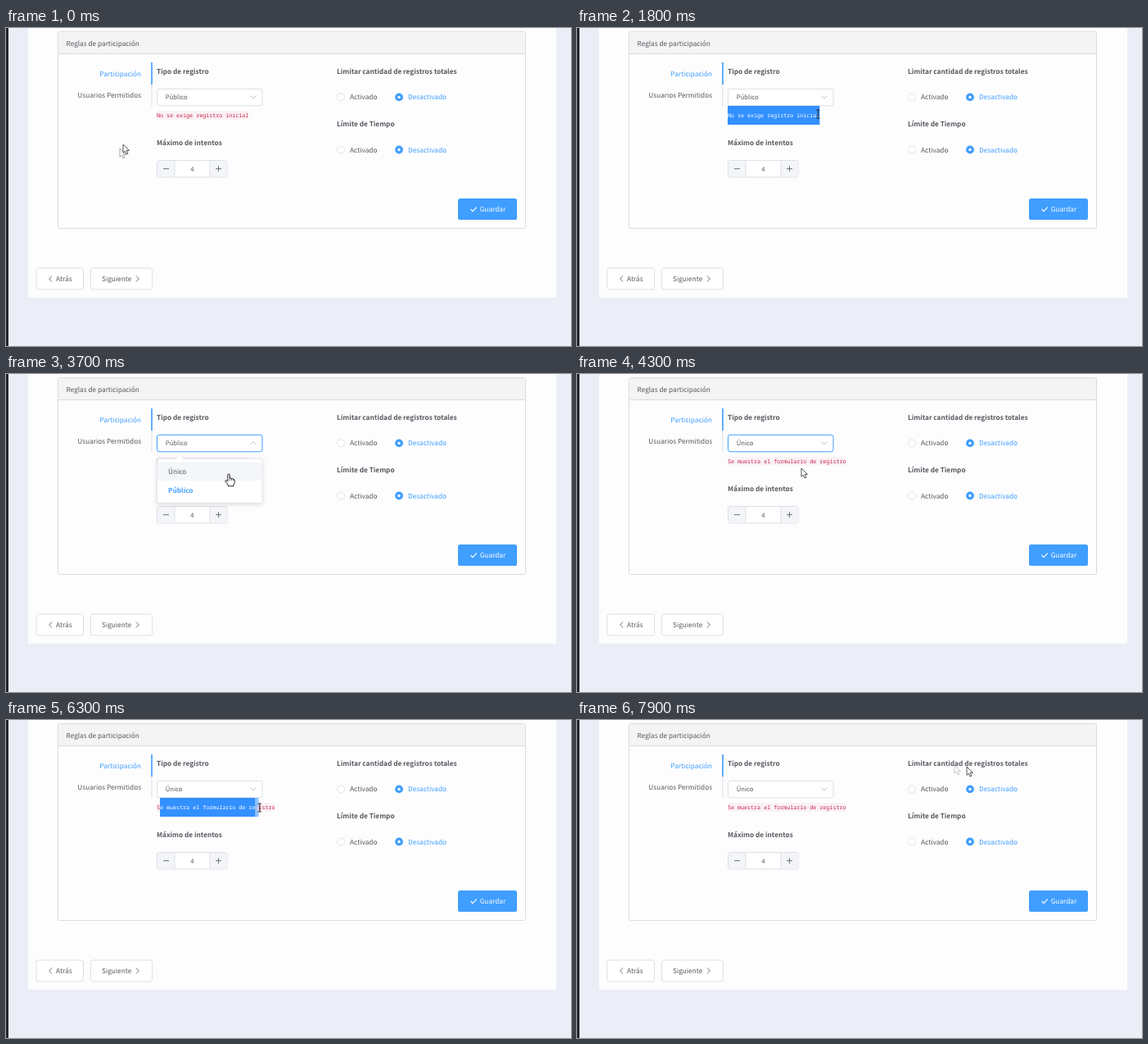
Recreate the animation shown at these times as an HTML page. Size 690x388 px, loop 8 s.

```html
<!DOCTYPE html>
<html lang="es">
<head>
<meta charset="utf-8">
<style>
html, body { margin: 0; width: 100%; height: 100%; overflow: hidden; background: #ebeef6; }
svg { display: block; width: 100%; height: 100%; }
text { font: 8.26px "Noto Sans CJK SC", "Noto Sans CJK JP", "Noto Sans", sans-serif; fill: #55585e; text-rendering: geometricPrecision; white-space: pre; }
.b { font-weight: 700; }
.m { font-weight: 500; }
.s { font-size: 7.68px; }
.blue { fill: #409eff; }
.white { fill: #fff; }
.code { font: 6.69px "Noto Sans Mono", "DejaVu Sans Mono", monospace; fill: #c7254e; }
.code.white { fill: #fff; }
.box { fill: #fff; stroke: #dcdfe6; }
.line { fill: none; stroke: #606266; stroke-width: .9; }
</style>
</head>
<body>
<svg viewBox="0 0 690 388" preserveAspectRatio="none">
  <defs>
    <filter id="shadow" x="-10%" y="-10%" width="120%" height="130%">
      <feDropShadow dx="0" dy="1.3" stdDeviation="2.5" flood-opacity=".14"/>
    </filter>
    <clipPath id="clip"><rect id="clipBox" y="95" height="23"/></clipPath>
  </defs>

  <rect width="690" height="388" fill="#ebeef6"/>
  <rect width="3" height="388" fill="#22272e"/>
  <rect x="27" width="645" height="329" fill="#fdfdfe"/>
  <rect x="63.5" y="4.5" width="571" height="240" rx="2" fill="#fdfdfe" stroke="#dcdcde"/>
  <path d="M64 5H634V31.5H64Z" fill="#f4f4f5"/>
  <path d="M64 31.5H634" stroke="#dcdcde"/>
  <text x="73.5" y="21.5" fill="#444">Reglas de participación</text>

  <path d="M178 42V95" stroke="#e4e7ed" stroke-width="1.4"/>
  <path d="M178 42V69" stroke="#409eff" stroke-width="1.6"/>
  <text class="blue" x="165" y="58.6" text-anchor="end">Participación</text>
  <text x="165" y="85.2" text-anchor="end">Usuarios Permitidos</text>

  <text class="b" x="184" y="56">Tipo de registro</text>
  <text class="b" x="184" y="143.4">Máximo de intentos</text>
  <text class="b" x="404" y="56">Limitar cantidad de registros totales</text>
  <text class="b" x="404" y="120.2">Límite de Tiempo</text>
  <g id="radios"></g>

  <rect class="box" x="184.5" y="161.5" width="85.5" height="20.5" rx="2.5"/>
  <path d="M187 162H206V181.5H187Q185 181.5 185 179.5V164Q185 162 187 162ZM249 162H267.500Q269.500 162 269.500 164V179.500Q269.500 181.500 267.500 181.500H249Z" fill="#f3f5f9"/>
  <path d="M206 162V181.500M249 162V181.500" stroke="#dcdfe6"/>
  <path class="line" d="M192 171.700H199M256 171.700H263M259.500 168.200V175.200"/>
  <text class="s" x="227.300" y="174.600" text-anchor="middle">4</text>

  <rect x="552" y="208" width="72" height="26" rx="2.600" fill="#409eff"/>
  <path d="M567.500 221L570 223.600L574.700 218.600" fill="none" stroke="#fff" stroke-width="1.100"/>
  <text class="m white" x="578.700" y="224.200">Guardar</text>
  <rect class="box" x="37" y="293" width="57.500" height="26" rx="2.600"/>
  <rect class="box" x="103.500" y="293" width="75" height="26" rx="2.600"/>
  <path class="line" d="M56 302.500L52.700 306L56 309.500M159 302.500L162.300 306L159 309.500"/>
  <text class="m" x="61" y="309.200">Atrás</text>
  <text class="m" x="117" y="309.200">Siguiente</text>

  <rect id="select" class="box" x="184.500" y="74.300" width="128.500" height="20.500" rx="2.600"/>
  <text id="value" class="s" x="194.800" y="87.400"></text>
  <path id="chevron" d="M298.500 82.500L302 86L305.500 82.500" fill="none" stroke="#b8bcc5" stroke-width=".9"/>

  <rect id="codeBack" x="184" y="101" height="11" rx="1.500" fill="#faf1f4"/>
  <text id="code" class="code" x="184" y="108.800"></text>
  <rect id="mark" y="95" height="23" fill="#3390ff"/>
  <rect id="markEdge" y="95" height="23" fill="#3390ff" opacity=".55"/>
  <text id="codeSel" class="code white" x="184" y="108.800" clip-path="url(#clip)"></text>

  <g id="menu">
    <g filter="url(#shadow)">
      <rect id="menuBox" class="box" x="184.500" y="103.500" width="128.500" rx="2.600" stroke-width=".7"/>
    </g>
    <path d="M207.500 104L212 99.500L216.500 104Z" fill="#fff"/>
    <rect id="hover" x="185" width="127.500" height="22.400" fill="#f4f6fa"/>
    <text x="198" y="122.200">Único</text>
    <text class="b blue" x="198" y="144.600">Público</text>
    <g id="opening" fill="none">
      <path d="M185 129.300H313M185 152.900H313" stroke="#f58a62" stroke-width="1.400"/>
      <rect x="185.500" y="156.500" width="127" height="8" rx="3" stroke="#c2c4c8" stroke-width=".9"/>
    </g>
  </g>

  <g id="ghost" opacity=".35"></g>
  <g id="cursor"></g>
</svg>
<script>
const $ = id => document.getElementById(id);
const set = (id, attrs) => { for (const k in attrs) $(id).setAttribute(k, attrs[k]); };

$("radios").innerHTML = [84.4, 148.5].map(y => `
  <circle class="box" cx="409" cy="${y}" r="4.5" stroke-width=".9"/>
  <text x="420" y="${y + 3}">Activado</text>
  <circle class="blue" cx="480" cy="${y}" r="4.9"/><circle class="white" cx="480" cy="${y}" r="1.7"/>
  <text class="blue" x="491" y="${y + 3}">Desactivado</text>`).join("");

const shapes = {
  arrow: `<path d="M0 0V10.300L2.400 8.200L4 12L5.900 11.200L4.300 7.500H7.400Z" fill="#fff" stroke="#33363b" stroke-width=".85"/>`,
  beam: `<path d="M-2 -5H-.5L0 -4.500L.5 -5H2M-2 5H-.5L0 4.500L.5 5H2M0 -4.500V4.500" fill="none" stroke="#2b2d33" stroke-width="1.100"/>`,
  hand: `<path d="M-1.200 .6Q0 -.8 1.200 .6V5L3.600 5.400L6 6.200Q7.200 6.700 7.200 8V10.500L6 13V14.800H-.8V13.200L-4 9.400Q-4.800 8 -3.300 7.600L-1.200 9Z" fill="#fff" stroke="#25272c" stroke-width="1"/>
    <path d="M1.300 5V8M3.500 5.500V8M5.600 6.200V8.300" stroke="#25272c" stroke-width=".7"/>`
};

// time, x, y, pointer shape from that time on
const path = [
  [-100, 139, 147, "arrow"], [0, 143, 142, "arrow"], [500, 184, 106, "beam"], [900, 233, 106, "beam"],
  [1500, 294.3, 105, "beam"], [1800, 294.3, 105, "beam"], [2000, 282, 124, "arrow"], [2200, 282, 124, "arrow"],
  [2500, 288.5, 87, "hand"], [2800, 288.5, 87, "hand"], [3200, 280, 134, "hand"], [3500, 280, 134, "hand"],
  [3800, 268, 116, "hand"], [4100, 268, 116, "hand"], [4200, 274, 115, "arrow"], [4900, 274, 115, "arrow"],
  [5400, 189, 108, "beam"], [5600, 189, 108, "beam"], [6200, 304.5, 107, "beam"], [6300, 309.8, 107, "beam"],
  [6400, 321, 106, "beam"], [6500, 321, 106, "beam"], [6800, 302, 101, "arrow"], [7100, 302, 101, "arrow"],
  [7500, 421, 57, "arrow"], [7600, 421, 57, "arrow"], [7700, 432, 56, "arrow"], [7800, 461, 55, "arrow"],
  [7900, 476, 57, "arrow"]
];

function pointer(t) {
  let i = path.length - 1;
  while (i > 0 && path[i][0] > t) i--;
  const a = path[i], b = path[i + 1] || a;
  const k = b === a ? 0 : (t - a[0]) / (b[0] - a[0]);
  return { x: a[1] + (b[1] - a[1]) * k, y: a[2] + (b[2] - a[2]) * k, shape: a[3] };
}

function place(id, p) {
  $(id).innerHTML = shapes[p.shape];
  set(id, { transform: `translate(${p.x} ${p.y})` });
}

const LEFT = 184, CHAR = 4.014;
const charEdge = x => LEFT + CHAR * Math.round((x - LEFT) / CHAR + .15);

function draw(t) {
  const now = pointer(t), before = pointer(t - 100);
  const single = t >= 4100;
  const message = single ? "Se muestra el formulario de registro" : "No se exige registro inicial";
  $("value").textContent = single ? "Único" : "Público";
  $("code").textContent = $("codeSel").textContent = message;
  set("codeBack", { width: CHAR * message.length });

  const open = t >= 2700 && t < 4100;
  set("select", { style: t >= 2700 && t < 5700 ? "stroke:#409eff" : "" });
  set("chevron", { transform: open ? "rotate(180 302 84.3)" : "" });

  const opacity = t < 2700 ? 0 : t < 2800 ? .5 : t < 4100 ? 1 : t < 4200 ? .4 : 0;
  const opening = t < 3000;
  set("menu", { opacity });
  set("menuBox", { height: opening ? 61 : 54 });
  set("opening", { opacity: opening ? 1 : 0 });
  set("hover", { y: t < 3700 ? 130 : 107.7 });

  const first = t >= 500 && t < 2200, second = t >= 5600 && t < 6500;
  const start = second ? LEFT + CHAR : LEFT;
  const limit = LEFT + CHAR * message.length;
  const edge = p => Math.max(start, Math.min(limit, charEdge(p.x)));
  let end = start, solid = start;
  if (first) {
    end = t < 1800 ? edge(now) : limit;
    solid = t < 1800 ? edge(before) : limit;
  } else if (second) {
    end = edge(now);
    solid = edge(before);
  }
  set("mark", { x: start, width: solid - start });
  set("markEdge", { x: solid, width: end - solid });
  set("clipBox", { x: start, width: end - start });

  place("cursor", now);
  place("ghost", before);
  const trail = now.shape === "arrow" && before.shape === "arrow" && now.x !== before.x;
  set("ghost", { opacity: trail ? (t < 100 ? .5 : .3) : 0 });
}

const begin = performance.now();
function tick() {
  const t = (performance.now() - begin) % 8000;
  draw(Math.floor(t / 100) * 100);
  requestAnimationFrame(tick);
}
tick();
</script>
</body>
</html>
```
